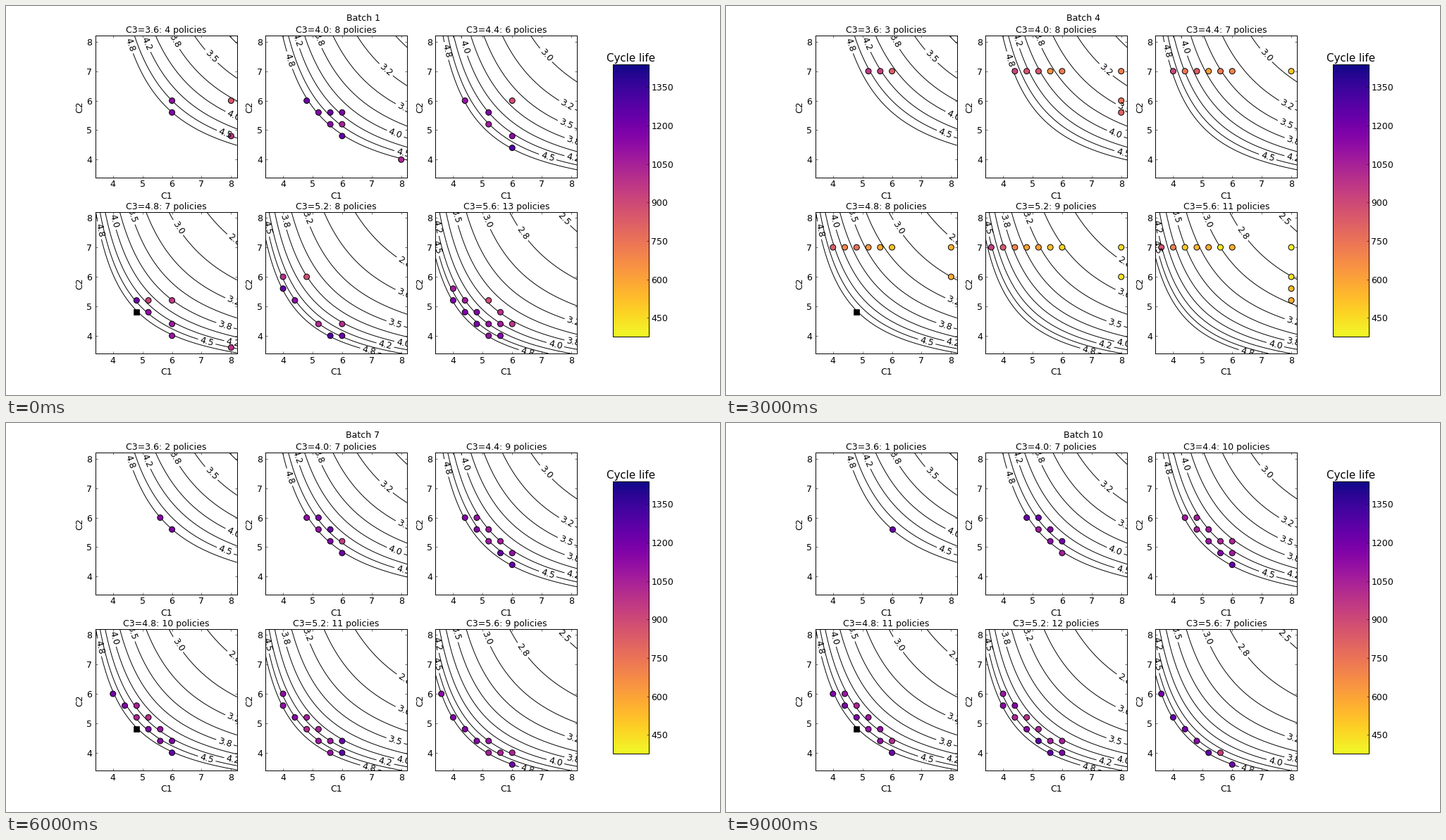
Animation, 1013 px wide and 553 px high, one loop 10000 ms. Source, as a matplotlib script:

```python
import math
import random

import numpy as np
import matplotlib.pyplot as plt
from matplotlib.animation import FuncAnimation
from matplotlib.cm import ScalarMappable
from matplotlib.colors import Normalize

W, H, DPI = 1013, 553, 100
LOW, HIGH = 3.4, 8.2
BATCHES = 10
BASELINE = 4.8
MAX_C4 = 4.81
NORM = Normalize(377, 1439)
CMAP = "plasma_r"

C1_STEPS = [3.6, 4.0, 4.4, 4.8, 5.2, 5.6, 6.0, 8.0]
C2_STEPS = [3.6, 4.0, 4.4, 4.8, 5.2, 5.6, 6.0, 7.0]
C3_STEPS = [3.6, 4.0, 4.4, 4.8, 5.2, 5.6]

# Policies per C3 in the first and the last batch
FIRST_COUNTS = [4, 8, 6, 7, 8, 13]
LAST_COUNTS = [1, 7, 10, 11, 12, 7]

plt.rcParams.update({
    "font.family": "DejaVu Sans", "font.size": 9, "axes.linewidth": 0.7,
    "xtick.direction": "in", "ytick.direction": "in",
    "xtick.top": True, "ytick.right": True,
    "xtick.major.size": 2.2, "ytick.major.size": 2.2,
    "xtick.major.width": 0.4, "ytick.major.width": 0.4,
    "xtick.major.pad": 2.8, "ytick.major.pad": 3,
})


def choose(batch, c3, count):
    """Best scored policies of a batch as rows of C1, C2 and cycle life."""
    rng = random.Random(100 * batch + round(10 * c3))
    limit = 5 / 6 - 1 / MAX_C4 - 1 / c3
    spread = 0.04 * math.exp(-(batch - 1) / 2)
    explore = math.exp(-2 * (batch - 4) ** 2)  # batch 4 tries the outer rates
    scored = []
    for c1 in C1_STEPS:
        for c2 in C2_STEPS:
            margin = limit - 1 / c1 - 1 / c2
            if margin < 0 or c1 == c2 == c3 == BASELINE:
                continue
            outer = c1 == 8 or c2 == 7
            tilt = c1 - c2
            score = -margin + 0.004 * tilt + rng.gauss(0, spread)
            life = 1180 - 3800 * margin + 20 * tilt + rng.gauss(0, 60)
            if outer:
                score += 0.1 * explore * c2 - 0.06 * (1 - explore)
                life -= 200
            scored.append((score, c1, c2, max(life, 400)))
    best = sorted(scored, reverse=True)[:count]
    return np.array([row[1:] for row in best])


fig = plt.figure(figsize=(W / DPI, H / DPI), dpi=DPI, facecolor="white")


def box(x, y, w, h):
    return fig.add_axes([x / W, 1 - (y + h) / H, w / W, h / H])


def write(x, y, text, **kw):
    return fig.text(x / W, 1 - y / H, text, ha="center", va="baseline", **kw)


# The label finder works on blocks of vertices, so the grid step sets its reach.
grid = np.linspace(LOW, HIGH, 254)
X, Y = np.meshgrid(grid, grid)


def draw_contours(ax, c3):
    rest = 5 / 6 - 1 / X - 1 / Y - 1 / c3
    lines = ax.contour(X, Y, 1 / np.maximum(rest, 0.2), np.arange(2.5, 4.8, 0.25),
                       colors="k", linewidths=0.7, zorder=1)
    lines.clabel(fmt="%.1f", fontsize=9, inline_spacing=3)


class Panel:
    def __init__(self, index, c3):
        side = 0.675 * W / 3.4
        left = 0.125 * W + 1.2 * side * (index % 3)
        top = 42.4 + 250.4 * (index // 3)
        mid = left + side / 2
        self.index, self.c3 = index, c3
        self.title = write(mid, top - 4, "")
        write(mid, top + side + 30, "C1")
        write(left - 18.3, top + side / 2 + 1, "C2",
              rotation=90, rotation_mode="anchor")
        ax = box(left, top, side, side)
        ax.set(xlim=(LOW, HIGH), ylim=(LOW, HIGH),
               xticks=range(4, 9), yticks=range(4, 9))
        draw_contours(ax, c3)
        self.dots = ax.scatter([], [], c=[], cmap=CMAP, norm=NORM, s=33,
                               edgecolors="k", linewidths=0.7, zorder=2)
        if c3 == BASELINE:
            ax.plot(BASELINE, BASELINE, "ks", ms=5.8, mew=0.5, zorder=2.5)

    def show(self, batch):
        first, last = FIRST_COUNTS[self.index], LAST_COUNTS[self.index]
        count = round(first + (last - first) * (batch - 1) / (BATCHES - 1))
        rows = choose(batch, self.c3, count)
        self.title.set_text(f"C3={self.c3:.1f}: {len(rows)} policies")
        self.dots.set_offsets(rows[:, :2])
        self.dots.set_array(rows[:, 2])


heading = write(W / 2, 21, "")
panels = [Panel(i, c3) for i, c3 in enumerate(C3_STEPS)]

bar_ax = box(0.85 * W, 0.15 * H, 0.05 * W, 0.7 * H)
bar = fig.colorbar(ScalarMappable(NORM, CMAP), cax=bar_ax, ticks=range(450, 1351, 150))
bar.outline.set_linewidth(0.7)
bar_ax.tick_params(pad=2.6)
write(0.875 * W, 79, "Cycle life", fontsize=10.8)


def draw(frame):
    heading.set_text(f"Batch {frame + 1}")
    for panel in panels:
        panel.show(frame + 1)
    return []


anim = FuncAnimation(fig, draw, frames=BATCHES, interval=1000, repeat=True)
plt.show()
```
